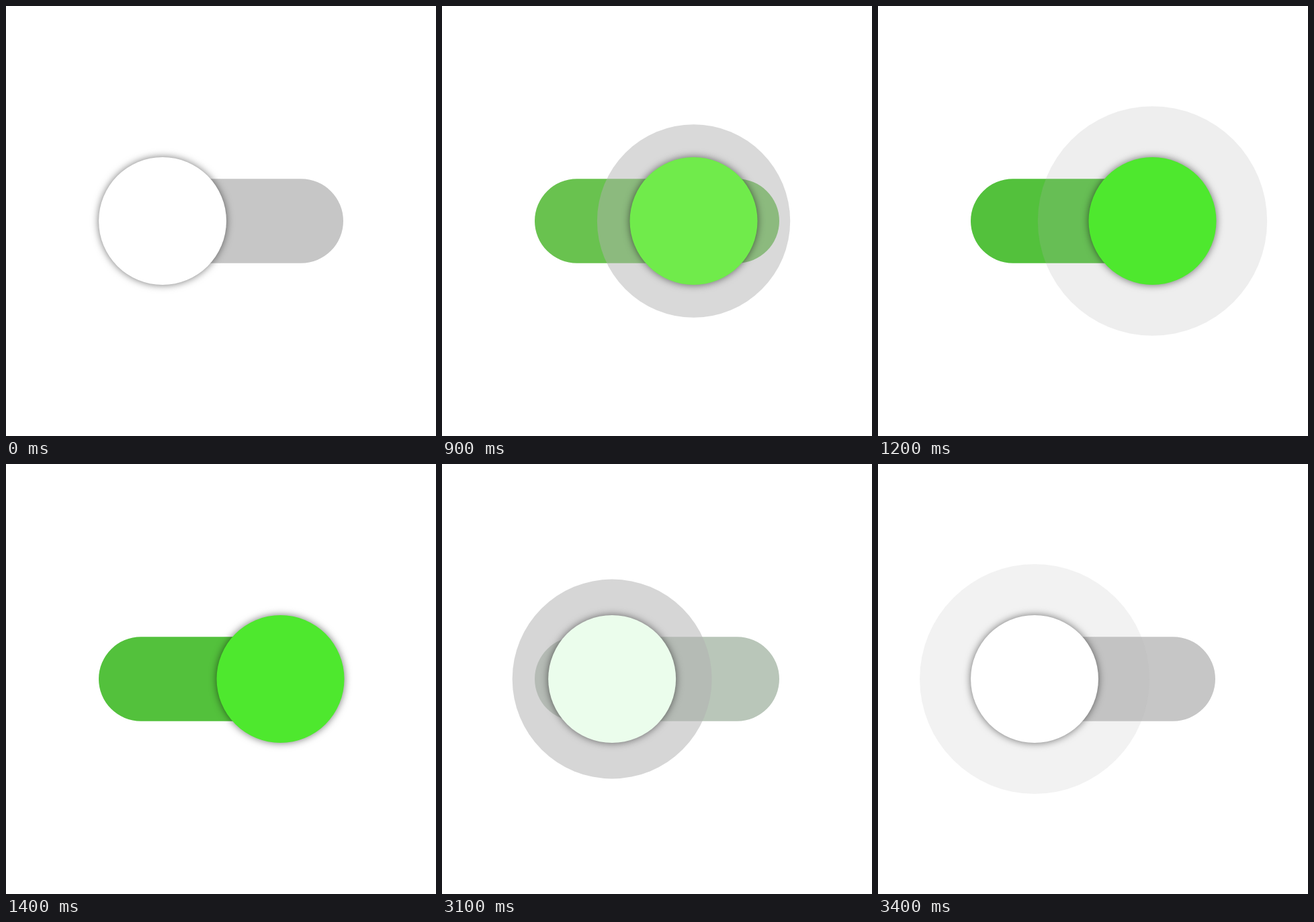
Animation, 640 px wide and 640 px high, one loop 4.8 s. Source, as an HTML page with a canvas:

```html
<!DOCTYPE html>
<html lang="en">
<head>
<meta charset="utf-8">
<title>Toggle switch</title>
<style>
  html, body { margin: 0; height: 100%; overflow: hidden; background: #fff; }
  canvas { display: block; }
</style>
</head>
<body>
<canvas width="640" height="640"></canvas>
<script>
const ctx = document.querySelector('canvas').getContext('2d');
const LOOP = 4800, STEP = 100;
const KNOB = { off: [255, 255, 255], on: [78, 232, 46] };
const TRACK = { off: [198, 198, 198], on: [83, 193, 60] };

const clamp = v => Math.min(1, Math.max(0, v));
const lerp = (a, b, p) => a + (b - a) * p;

// cubic-bezier(.25, .1, .25, 1)
function ease(t) {
  t = clamp(t);
  if (t === 0 || t === 1) return t;
  const curve = (a, b, s) => 3 * a * s * (1 - s) ** 2 + 3 * b * s * s * (1 - s) + s ** 3;
  let lo = 0, hi = 1;
  for (let i = 0; i < 24; i++) {
    const mid = (lo + hi) / 2;
    if (curve(.25, .25, mid) < t) lo = mid; else hi = mid;
  }
  return curve(.1, 1, lo);
}

// Green and blue run a little ahead of red.
function mix(from, to, p, power) {
  const c = from.map((v, i) => Math.round(lerp(v, to[i], i ? p ** power : p)));
  return `rgb(${c})`;
}

function disc(x, r, fill) {
  ctx.fillStyle = fill;
  ctx.beginPath();
  ctx.arc(x, 320, r, 0, 2 * Math.PI);
  ctx.fill();
}

function ringAlpha(age, p) {
  return .6 * (age < 235 ? p : clamp(1 - (age - 235) / 290));
}

function draw(time) {
  const turningOff = time >= 3000;
  const age = turningOff ? Math.min(time, 3400) - 2956 : time < 800 ? 0 : time - 779;
  const p = ease(age / 240);
  const [from, to] = turningOff ? ['on', 'off'] : ['off', 'on'];
  const power = turningOff ? .8 : .69;
  const x = turningOff ? lerp(408.5, 233, p) : lerp(233, 408.5, p);

  ctx.fillStyle = '#fff';
  ctx.fillRect(0, 0, 640, 640);

  ctx.fillStyle = mix(TRACK[from], TRACK[to], p, power);
  ctx.beginPath();
  ctx.roundRect(138, 257.3, 364, 125.4, 62.7);
  ctx.fill();

  const alpha = ringAlpha(age, p);
  if (alpha > 0) disc(x, lerp(123.5, 171, ease(age / 470)), `rgba(177,177,177,${alpha})`);

  ctx.save();
  ctx.shadowColor = 'rgba(0,0,0,.55)';
  ctx.shadowBlur = 12;
  disc(x, 95, mix(KNOB[from], KNOB[to], p, power));
  ctx.restore();
}

const start = performance.now();
function tick() {
  const time = (performance.now() - start) % LOOP;
  draw(Math.floor(time / STEP) * STEP);
  requestAnimationFrame(tick);
}
tick();
</script>
</body>
</html>
```
